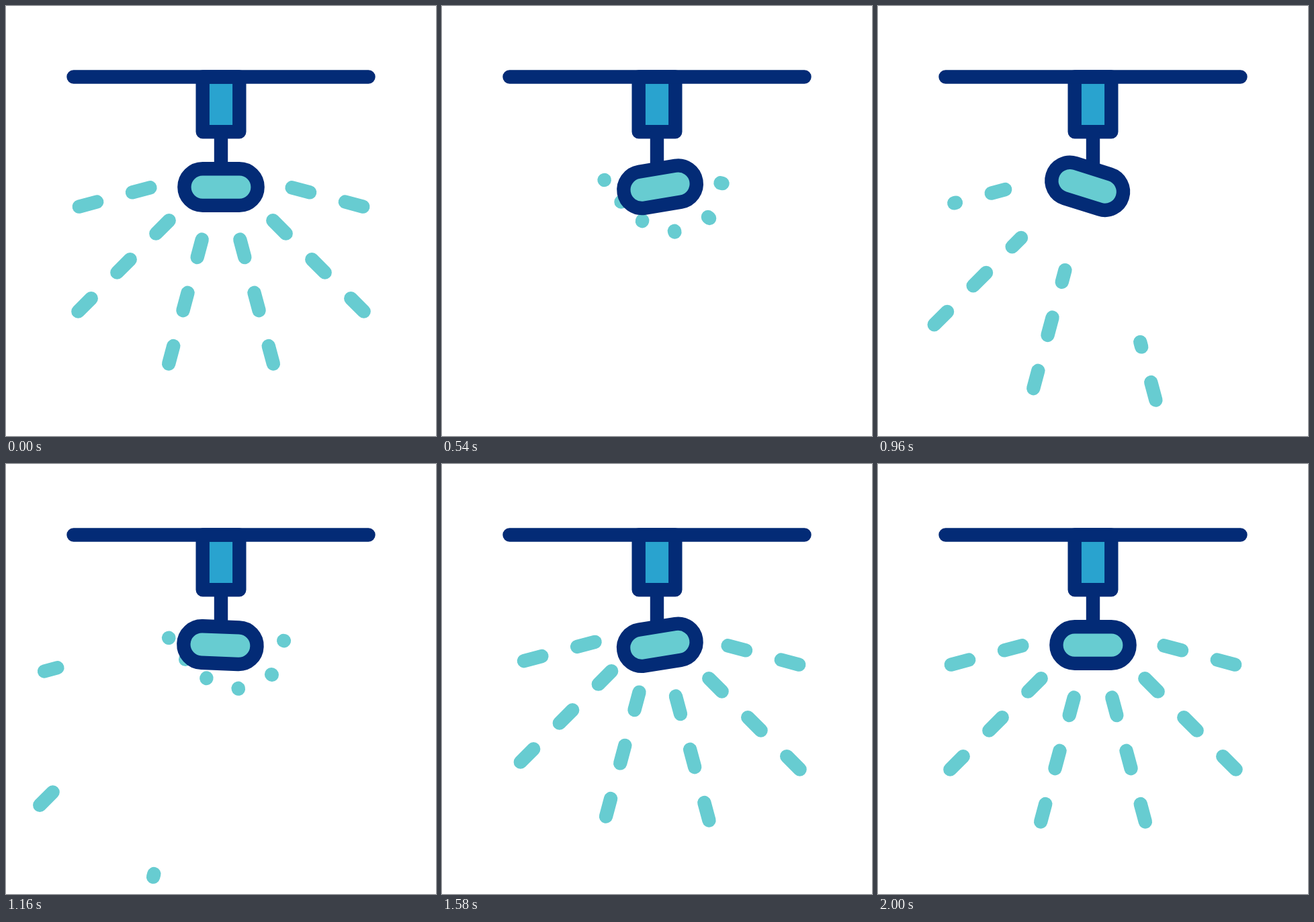
These frames come from a looping animation (640 px wide and 640 px high, 2.4 s). An HTML page with a canvas:

```html
<!DOCTYPE html>
<html>
<head>
<meta charset="utf-8">
<style>
html, body { margin: 0; height: 100%; overflow: hidden; background: #fff; }
canvas { display: block; }
</style>
</head>
<body>
<canvas id="stage" width="640" height="640"></canvas>
<script>
const ctx = document.getElementById('stage').getContext('2d');
const NAVY = '#032b76', BLUE = '#29a3cf', TEAL = '#67ccd1';
const LOOP = 2400, WIDTH = 20.4;
const PIVOT_X = 320, PIVOT_Y = 242, RADIUS = 109.3;
const DASH = 27.4, STEP = 82;
const BURST = 520, REFILL = 1140;
const SWING = [[0, 0], [320, 17.5], [640, -17.5], [960, 17.5], [1400, -17.5], [1770, 0]];

const clamp = x => Math.max(0, Math.min(1, x));
const smooth = x => { x = clamp(x); return x * x * (3 - 2 * x); };
const mix = (a, b, k) => a + (b - a) * k;

// Six rays fan out around the pivot, from right (0) to left (5)
const rays = Array.from({ length: 6 }, (_, i) => {
  const angle = (15 + 30 * i) * Math.PI / 180;
  const dx = Math.cos(angle), dy = Math.sin(angle), skew = Math.sin(2 * angle);
  const count = i % 5 ? 3 : 2;
  return {
    i, dx, dy, count,
    length: (count - 1) * STEP + DASH,
    near: -22 + 16 * skew,
    far: 40 + 40 * dy - 15 * skew,
    lift: -4 * dx,
    gone: 800 + 8 * i + 350 * smooth((i - 0.3) / 3)
  };
});

// Draw the part of a ray between fractions u and v, moved outwards by shift
function drawRay(r, shift, u, v, lift = 0) {
  const x = PIVOT_X + r.dx * (RADIUS + shift) - r.dy * lift;
  const y = PIVOT_Y + r.dy * (RADIUS + shift) + r.dx * lift;
  for (let k = 0; k < r.count; k++) {
    const a = Math.max(u * r.length, k * STEP);
    const b = Math.min(v * r.length, k * STEP + DASH);
    if (b < a) continue;
    ctx.beginPath();
    ctx.moveTo(x + r.dx * a, y + r.dy * a);
    ctx.lineTo(x + r.dx * b + 0.01, y + r.dy * b);
    ctx.stroke();
  }
}

// The resting spray flies off and is eaten from its outer end
function drawExit(r, t) {
  const age = Math.max(0, t - 20 * r.i);
  const k = (age - 125) / 97;
  if (k <= 1) drawRay(r, 111 * (age / 220) ** 1.5, 0, (1 - clamp(k)) ** 1.5);
}

// A burst grows out of the head, then leaves from its inner end
function drawBurst(r, t) {
  if (t < BURST || t > r.gone) return;
  const k = (t - BURST) / (r.gone - BURST);
  const v = clamp((t - BURST) / (125 * 1.32 ** r.i)) ** 2;
  const u = clamp(1 - (r.gone - t) / (200 + 20 * r.i)) ** 2;
  drawRay(r, mix(r.near, r.far, k ** 1.4), u, v, r.lift);
}

// The last spray grows and settles at rest
function drawRefill(r, t) {
  const age = t - REFILL;
  if (age < 0) return;
  const left = 1 - smooth(age / (400 + 90 * r.i));
  drawRay(r, r.near * left, 0, clamp(age / (250 + 35 * r.i)) ** 2, r.lift * left);
}

function drawMount() {
  ctx.strokeStyle = NAVY;
  ctx.fillStyle = BLUE;
  ctx.beginPath();
  ctx.rect(292.7, 105.5, 54.6, 81.8);
  ctx.fill();
  ctx.stroke();
  ctx.beginPath();
  ctx.moveTo(100.5, 105.5);
  ctx.lineTo(539.5, 105.5);
  ctx.moveTo(320, 190);
  ctx.lineTo(320, 236);
  ctx.stroke();
}

function headAngle(t) {
  const n = SWING.findIndex(([time]) => time > t);
  if (n < 0) return 0;
  const [t0, a0] = SWING[n - 1], [t1, a1] = SWING[n];
  return mix(a0, a1, smooth((t - t0) / (t1 - t0)));
}

function drawHead(deg) {
  ctx.save();
  ctx.translate(PIVOT_X, PIVOT_Y);
  ctx.rotate(deg * Math.PI / 180);
  ctx.fillStyle = TEAL;
  ctx.beginPath();
  ctx.roundRect(-54.6, 0.3, 109.2, 54.6, 27.3);
  ctx.fill();
  ctx.stroke();
  ctx.restore();
}

function frame() {
  const t = performance.now() % LOOP;
  ctx.fillStyle = '#fff';
  ctx.fillRect(0, 0, 640, 640);
  ctx.lineWidth = WIDTH;
  ctx.lineCap = ctx.lineJoin = 'round';
  ctx.strokeStyle = TEAL;
  for (const r of rays) {
    drawExit(r, t);
    drawBurst(r, t);
    drawRefill(r, t);
  }
  drawMount();
  drawHead(headAngle(t));
  requestAnimationFrame(frame);
}
frame();
</script>
</body>
</html>
```
